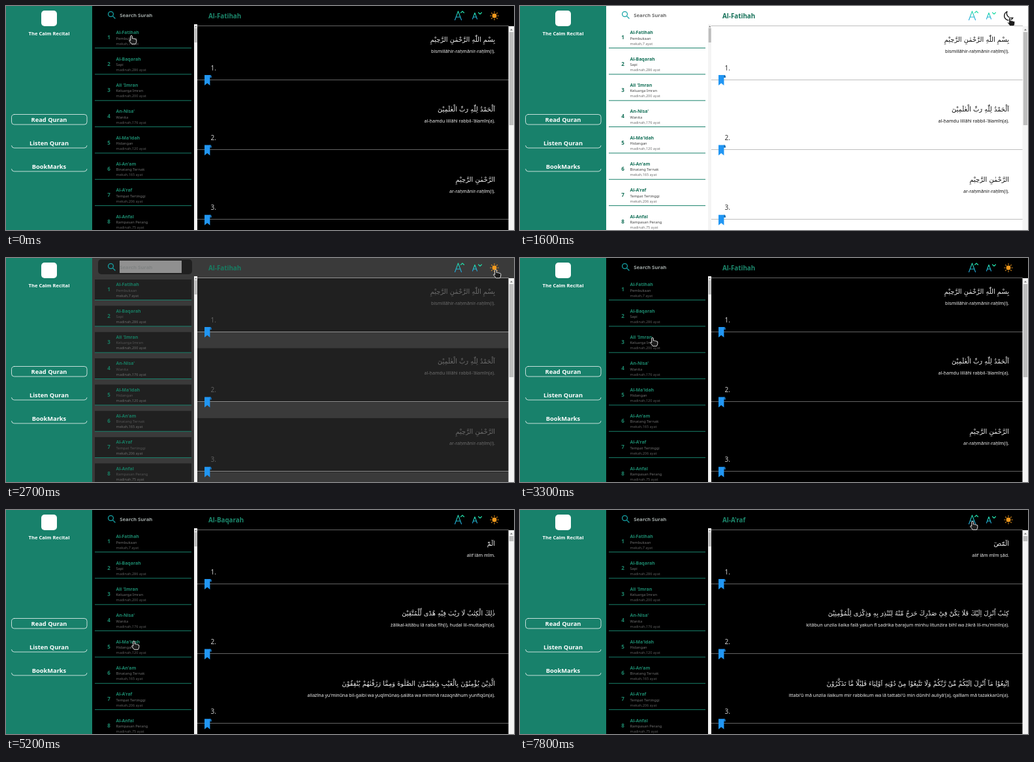
Recreate the animation shown at these times as an HTML page. Size 778x344 px, loop 8000 ms.

```html
<!DOCTYPE html>
<html lang="en">
<head>
<meta charset="utf-8">
<title>Quran reader</title>
<style>
  html, body { margin: 0; width: 100%; height: 100%; overflow: hidden; background: #000; }
  svg { display: block; width: 778px; height: 344px; font-family: "Noto Sans", "Open Sans", sans-serif; }
  .page { fill: var(--page); }
  .card { fill: var(--card); }
  .rule { stroke: var(--rule); }
  .green { fill: var(--green); font-weight: 700; }
  .side { fill: #fff; font-weight: 600; text-anchor: middle; }
  .menu { font-size: 9.3px; }
  .search { fill: var(--hint); font-weight: 600; font-size: 7.7px; }
  .num { font-size: 8px; text-anchor: middle; }
  .name { font-size: 6.9px; }
  .meaning { fill: var(--meaning); font-size: 5.7px; }
  .info { fill: var(--info); font-size: 5.5px; font-weight: 300; }
  .title { font-size: 9.8px; }
  .arabic { fill: var(--ink); font: 9.9px "DejaVu Sans", sans-serif; }
  .latin { fill: var(--ink); font-size: 7.1px; }
  .count { fill: var(--ink); font-size: 10px; font-weight: 300; opacity: .85; }
  .right { text-anchor: end; }
  .stroke { fill: none; stroke-linecap: round; stroke-linejoin: round; }
</style>
</head>
<body>
<svg id="stage" viewBox="0 0 778 344">
  <defs>
    <linearGradient id="letter" x1="0" y1="0" x2="0" y2="1">
      <stop offset="0" stop-color="#22dca8"/><stop offset="1" stop-color="#22a5e0"/>
    </linearGradient>
  </defs>
  <rect class="page" width="778" height="344"/>
  <g id="list"></g>
  <g id="reader"></g>

  <rect width="132" height="344" fill="#18816b"/>
  <rect x="54" y="7" width="24" height="24" rx="5" fill="#fff"/>
  <text class="side" x="66" y="44.5" font-size="7.6">The Calm Recital</text>
  <g class="stroke" stroke="#fff" stroke-opacity=".75">
    <rect x="8.5" y="166.5" width="115.5" height="15.5" rx="4"/>
    <path d="M8.5 214.5q.5 3.5 4 3.5H120q3.5 0 4-3.5M8.5 250.5q.5 3.5 4 3.5H120q3.5 0 4-3.5"/>
  </g>
  <text class="side menu" x="66" y="178">Read Quran</text>
  <text class="side menu" x="66" y="214">Listen Quran</text>
  <text class="side menu" x="66" y="250">BookMarks</text>

  <rect class="card" x="141" y="2" width="144" height="23" rx="5"/>
  <rect x="174" y="4" width="95" height="19" fill="var(--input)"/>
  <g class="stroke" stroke="#16a3a6" stroke-width="1.3">
    <circle cx="160.5" cy="12.5" r="3.9"/><path d="M163.4 15.4l3.6 3.6"/>
  </g>
  <text class="search" x="174.3" y="16.8">Search Surah</text>

  <path class="rule" d="M293 30.5H770"/>
  <g class="stroke" stroke="url(#letter)" stroke-width="1.1">
    <path d="M687.5 21.5L692.5 8L697.5 21.5M689.3 17H695.7"/>
    <path d="M714.5 20L718 10.5L721.5 20M715.7 17H720.3"/>
    <path d="M696.5 10.5L699 8L701.5 10.5M723.5 10L726 12.5L728.5 10" stroke="#22dca8"/>
  </g>
  <g id="sun" class="stroke" stroke="#f39a1e" stroke-width="1.1"></g>
  <path id="moon" class="stroke" stroke="#111" stroke-width="1.3"
    d="M746 8.5A7 7 0 1 0 755 18A7.2 7.2 0 0 1 746 8.5Z"/>

  <rect x="288" y="28" width="5" height="316" fill="#f4f4f4"/>
  <rect x="288.7" y="34" width="4" height="22" fill="#bdbdbd"/>
  <path d="M289 32.5l1.7-2.2l1.7 2.2z" fill="#777"/>
  <rect x="769.5" y="31" width="8.5" height="313" fill="#f4f4f4"/>
  <rect id="thumb" x="770.8" y="40" width="6.4" fill="#bdbdbd"/>
  <path d="M772 37.5l2-2.6l2 2.6z" fill="#777"/>

  <path id="hand" fill="#1c1c1c" stroke="#f4f4f4" stroke-width=".9" stroke-linejoin="round"
    d="M-1.3 1.2Q0-.8 1.3 1.2V5Q2.6 4.2 3.6 5.4Q4.9 4.7 5.8 6Q7.4 5.4 7.8 7V9.5Q7.5 11.5 6.4 13.3H.3Q-1.6 10.6-3.4 8.3Q-3.2 6.3-1.3 8Z"/>
</svg>

<script>
const byId = id => document.getElementById(id);

const text = (cls, x, y, content) => `<text class="${cls}" x="${x}" y="${y}">${content}</text>`;

// Surah list: name, meaning, info
const chapters = [
  ["Al-Fatihah", "Pembukaan", "mekah,7 ayat"],
  ["Al-Baqarah", "Sapi", "madinah,286 ayat"],
  ["Ali 'Imran", "Keluarga Imran", "madinah,200 ayat"],
  ["An-Nisa'", "Wanita", "madinah,176 ayat"],
  ["Al-Ma'idah", "Hidangan", "madinah,120 ayat"],
  ["Al-An'am", "Binatang Ternak", "mekah,165 ayat"],
  ["Al-A'raf", "Tempat Tertinggi", "mekah,206 ayat"],
  ["Al-Anfal", "Rampasan Perang", "madinah,75 ayat"]
];

byId("list").innerHTML = chapters.map(([name, meaning, info], i) =>
  `<g transform="translate(0 ${i * 40.35})">
    <rect class="card" x="136" y="33" width="148" height="31.5"/>
    <path d="M136 64.5H284" stroke="#18816b"/>
    ${text("green num", 157.5, 51.3, i + 1)}
    ${text("green name", 168.5, 43.2, name)}
    ${text("meaning", 168.5, 51.6, meaning)}
    ${text("info", 168.5, 59.6, info)}
  </g>`).join("");

// Evenly spaced verses with one Arabic and one Latin line each
const short = verses => verses.map(([arabic, latin], i) => ({
  arabic: [arabic], latin: [latin], top: 55 + i * 107.4, latinTop: 72 + i * 107.4, end: 114 + i * 107.4
}));

const pages = [
  { from: 0, title: "Al-Fatihah", thumb: 143, verses: short([
    ["بِسْمِ اللّٰهِ الرَّحْمٰنِ الرَّحِيْمِ", "bismillāhir-raḥmānir-raḥīm(i)."],
    ["اَلْحَمْدُ لِلّٰهِ رَبِّ الْعٰلَمِيْنَ", "al-ḥamdu lillāhi rabbil-'ālamīn(a)."],
    ["الرَّحْمٰنِ الرَّحِيْمِ", "ar-raḥmānir-raḥīm(i)."]
  ]) },
  { from: 4700, title: "Al-Baqarah", thumb: 8, verses: short([
    ["الٓمّٓ", "alif lām mīm."],
    ["ذٰلِكَ الْكِتٰبُ لَا رَيْبَ فِيْهِ هُدًى لِّلْمُتَّقِيْنَ", "żālikal-kitābu lā raiba fīh(i), hudal lil-muttaqīn(a)."],
    ["الَّذِيْنَ يُؤْمِنُوْنَ بِالْغَيْبِ وَيُقِيْمُوْنَ الصَّلٰوةَ وَمِمَّا رَزَقْنٰهُمْ يُنْفِقُوْنَ",
      "allażīna yu'minūna bil-gaibi wa yuqīmūnaṣ-ṣalāta wa mimmā razaqnāhum yunfiqūn(a)."]
  ]) },
  { from: 5500, title: "Al-Ma'idah", thumb: 8, left: true, verses: [
    { top: 55.5, latinTop: 86.5, end: 141.5,
      arabic: [
        "يٰٓاَيُّهَا الَّذِيْنَ اٰمَنُوْٓا اَوْفُوْا بِالْعُقُوْدِ اُحِلَّتْ لَكُمْ بَهِيْمَةُ الْاَنْعَامِ اِلَّا مَا يُتْلٰى عَلَيْكُمْ غَيْرَ مُحِلِّى الصَّيْدِ وَاَنْتُمْ حُرُمٌ اِنَّ اللّٰهَ",
        "يَحْكُمُ مَا يُرِيْدُ"],
      latin: [
        "yā ayyuhal-lażīna āmanū aufū bil-'uqūd(i), uḥillat lakum bahīmatul-an'āmi illā mā yutlā 'alaikum gaira muḥilliṣ-ṣaidi wa antum",
        "ḥurum(un), innallāha yaḥkumu mā yurīd(u)."] },
    { top: 189, latinTop: 236, end: 315.5,
      arabic: [
        "يٰٓاَيُّهَا الَّذِيْنَ اٰمَنُوْا لَا تُحِلُّوْا شَعَآئِرَ اللّٰهِ وَلَا الشَّهْرَ الْحَرَامَ وَلَا الْهَدْيَ وَلَا الْقَلَآئِدَ وَلَآ اٰمِّيْنَ الْبَيْتَ الْحَرَامَ يَبْتَغُوْنَ فَضْلًا",
        "مِّنْ رَّبِّهِمْ وَرِضْوَانًا وَاِذَا حَلَلْتُمْ فَاصْطَادُوْا وَلَا يَجْرِمَنَّكُمْ شَنَاٰنُ قَوْمٍ اَنْ صَدُّوْكُمْ عَنِ الْمَسْجِدِ الْحَرَامِ اَنْ تَعْتَدُوْا",
        "وَتَعَاوَنُوْا عَلَى الْبِرِّ وَالتَّقْوٰى وَلَا تَعَاوَنُوْا عَلَى الْاِثْمِ وَالْعُدْوَانِ وَاتَّقُوا اللّٰهَ اِنَّ اللّٰهَ شَدِيْدُ الْعِقَابِ"],
      latin: [
        "yā ayyuhal-lażīna āmanū lā tuḥillū sya'ā'irallāhi wa lasy-syahral-ḥarāma wa lal-hadya wa lal-qalā'ida wa lā āmmīnal-baital-ḥarāma",
        "yabtagūna faḍlam mir rabbihim wa riḍwānā(n), wa iżā ḥalaltum faṣṭādū, wa lā yajrimannakum syana'ānu qaumin an ṣaddūkum",
        "'anil- asjidil-ḥarāmi an ta'tadū, wa ta'āwanū 'alal-birri wat-taqwā, wa lā ta'āwanū 'alal-iṡmi wal-'udwān(i), wattaqullāh(a), innallāha",
        "syadīdul-'iqāb(i)."] }
  ] },
  { from: 6600, title: "Al-A'raf", thumb: 8, verses: short([
    ["الٓمّٓصٓ", "alif lām mīm ṣād."],
    ["كِتٰبٌ اُنْزِلَ اِلَيْكَ فَلَا يَكُنْ فِيْ صَدْرِكَ حَرَجٌ مِّنْهُ لِتُنْذِرَ بِهِ وَذِكْرٰى لِلْمُؤْمِنِيْنَ",
      "kitābun unzila ilaika falā yakun fī ṣadrika ḥarajum minhu litunżira bihī wa żikrā lil-mu'minīn(a)."],
    ["اِتَّبِعُوْا مَآ اُنْزِلَ اِلَيْكُمْ مِّنْ رَّبِّكُمْ وَلَا تَتَّبِعُوْا مِنْ دُوْنِهِ اَوْلِيَاءَ قَلِيْلًا مَّا تَذَكَّرُوْنَ",
      "ittabi'ū mā unzila ilaikum mir rabbikum wa lā tattabi'ū min dūnihī auliyā'(a), qalīlam mā tażakkarūn(a)."]
  ]) }
];

const bookmark = y => `<g transform="translate(304 ${y - 8})">
  <path d="M8 0H9.5Q11 .4 11 4H8z" fill="#1769aa"/>
  <path d="M0 0H9.3Q8.4 1 8.4 3V16L4.2 12.5L0 16z" fill="#2196f3"/></g>`;

function verseMarkup(page, verse, i) {
  const cls = page.left ? "" : " right", x = page.left ? 314 : 749;
  const cardTop = i ? page.verses[i - 1].end + 24.5 : 31;
  return `<rect class="card" x="293" y="${cardTop}" width="477" height="${verse.end - cardTop}"/>
    <path class="rule" d="M293 ${Math.floor(verse.end) - .5}H770"/>` +
    verse.arabic.map((line, n) => text("arabic" + cls, x, verse.top + n * 15.3, line)).join("") +
    verse.latin.map((line, n) => text("latin" + cls, x, verse.latinTop + n * 12.1, line)).join("") +
    text("count", 313.5, verse.end - 15.5, `${i + 1}.`) + bookmark(verse.end);
}

byId("reader").innerHTML = pages.map(page =>
  `<g>${text("green title", 310, 18.6, page.title)}
  ${page.verses.map((verse, i) => verseMarkup(page, verse, i)).join("")}</g>`).join("");
const pageNodes = [...byId("reader").children];

byId("sun").innerHTML = '<circle cx="748" cy="15" r="2.9" fill="#f39a1e"/>' +
  Array.from({ length: 8 }, (_, i) => `<path d="M748 9.9V8.8" transform="rotate(${i * 45} 748 15)"/>`).join("");

// Theme colours: light, dark, fade time in ms
const theme = {
  page: [[255, 255, 255], [0, 0, 0], 260],
  card: [[255, 255, 255], [0, 0, 0], 230],
  input: [[255, 255, 255], [0, 0, 0], 460],
  ink: [[17, 17, 17], [240, 240, 240], 500],
  hint: [[105, 105, 105], [160, 168, 166], 500],
  meaning: [[65, 65, 65], [112, 112, 112], 500],
  info: [[115, 115, 115], [92, 92, 92], 500],
  rule: [[190, 190, 190], [100, 100, 100], 400],
  green: [[20, 112, 88], [28, 135, 108], 400]
};
const LIGHT_AT = 1600, DARK_AT = 2500, LOOP = 8000;

// Pointer tip: time, x, y
const pointer = [
  [0, 192, 45], [300, 197, 52], [500, 197, 52], [1300, 747, 17], [1400, 750, 17.5],
  [2750, 750, 17.5], [3300, 203, 122], [3700, 198, 170], [4200, 184, 84], [4400, 182, 76],
  [4700, 182, 76], [5100, 194, 240], [5200, 196, 201], [5900, 196, 201], [6400, 205, 290],
  [7000, 205, 290], [7800, 693, 17], [LOOP, 693, 17]
];

function pointerAt(t) {
  const i = pointer.findIndex(key => key[0] > t);
  const [t0, x0, y0] = pointer[i - 1], [t1, x1, y1] = pointer[i];
  const p = (t - t0) / (t1 - t0), e = p * p * (3 - 2 * p);
  return [x0 + (x1 - x0) * e, y0 + (y1 - y0) * e];
}

function render() {
  const t = performance.now() % LOOP;
  const isLight = t >= LIGHT_AT && t < DARK_AT;
  for (const [name, [light, dark, fade]] of Object.entries(theme)) {
    const k = t < LIGHT_AT ? 1 : isLight ? 0 : Math.min((t - DARK_AT) / fade, 1);
    const mixed = light.map((v, i) => Math.round(v + (dark[i] - v) * k));
    byId("stage").style.setProperty("--" + name, `rgb(${mixed})`);
  }
  byId("sun").style.display = isLight ? "none" : "";
  byId("moon").style.display = isLight ? "" : "none";

  const current = pages.filter(page => page.from <= t).length - 1;
  pageNodes.forEach((node, i) => node.style.display = i === current ? "" : "none");
  byId("thumb").setAttribute("height", pages[current].thumb);
  byId("hand").setAttribute("transform", `translate(${pointerAt(t)})`);
  requestAnimationFrame(render);
}
render();
</script>
</body>
</html>
```
